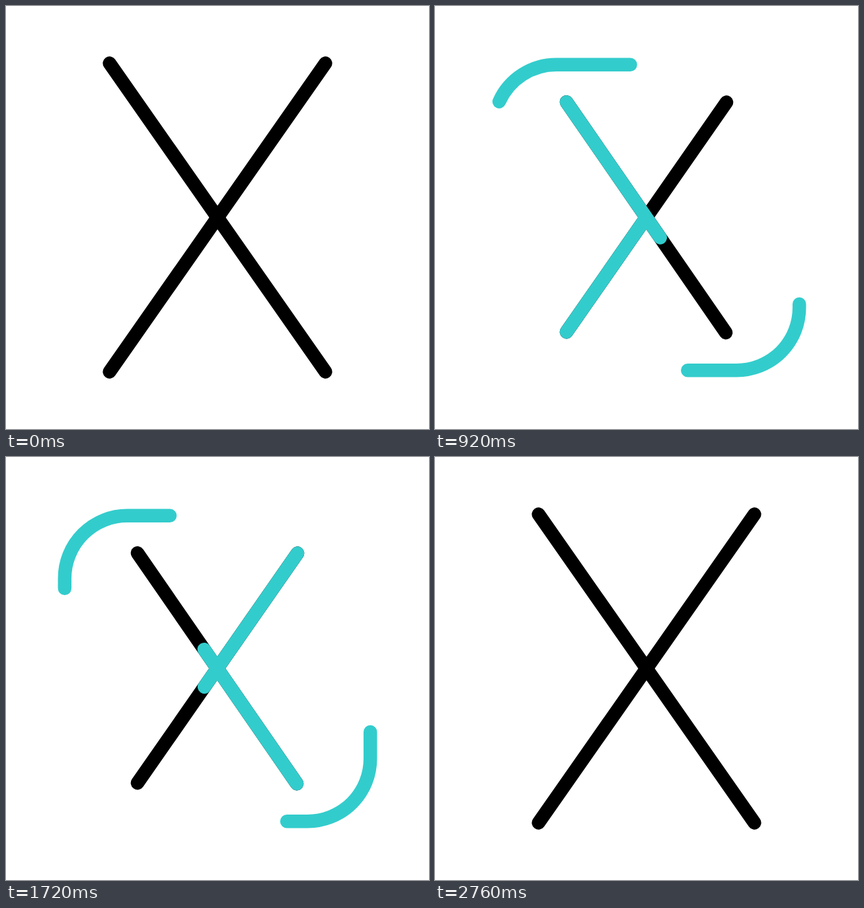
Animation of 640x640 px, one loop 3000 ms. Source, as an HTML page:

```html
<!DOCTYPE html>
<html lang="en">
<head>
<meta charset="utf-8">
<title>Crossing lines</title>
<style>
  html, body { margin: 0; width: 100%; height: 100%; overflow: hidden; background: #fff; }
  svg { display: block; width: 100vw; height: 100vh; }
  path, line { fill: none; stroke: #000; stroke-width: 20.5; stroke-linecap: round; }
  .teal { stroke: #3cc; }
</style>
</head>
<body>
<svg viewBox="0 0 640 640">
  <line id="bar0"/>
  <line id="bar1"/>
  <line id="fill0" class="teal"/>
  <line id="fill1" class="teal"/>
  <path id="arc0" class="teal" pathLength="1"
    d="M88.8 186V183.5A94.7 94.7 0 0 1 183.5 88.8H456.5A94.7 94.7 0 0 1 551.2 183.5V456.5A94.7 94.7 0 0 1 456.5 551.2H425"/>
  <path id="arc1" class="teal" pathLength="1"
    d="M551.2 451V456.5A94.7 94.7 0 0 1 456.5 551.2H183.5A94.7 94.7 0 0 1 88.8 456.5V183.5A94.7 94.7 0 0 1 183.5 88.8H248"/>
</svg>
<script>
const LOOP = 3000, STEP = 40;
const SPAN = 0.215; // share of the track covered by a travelling arc

// Times are [start, end] in ms; bar ends are [x1, y1, x2, y2].
const bars = [
  { wide: [156.7, 86.6, 483.3, 553.4], tight: [199, 145.3, 440, 494.2], enter: [513, 1241], leave: [1480, 2360] },
  { wide: [156.7, 553.4, 483.3, 86.6], tight: [199, 493.2, 441, 145.6], enter: [600, 1257], leave: [1480, 2360] }
];
const arcs = [
  { grow: [260, 718], travel: [816, 1562], shrink: [1882, 2373] },
  { grow: [340, 788], travel: [981, 1589], shrink: [1919, 2388] }
];
const squeeze = [160, 640], stretch = [2200, 2760];

const $ = id => document.getElementById(id);
const part = (t, [a, b]) => Math.min(1, Math.max(0, (t - a) / (b - a)));
const ease = (t, range) => { const u = part(t, range); return u * u * (3 - 2 * u); };
const easeOut = (t, range) => 1 - Math.pow(1 - part(t, range), 1.7);
const mix = (a, b, k) => a + (b - a) * k;

function setLine(el, [x1, y1, x2, y2], from, to) {
  el.setAttribute("x1", mix(x1, x2, from));
  el.setAttribute("y1", mix(y1, y2, from));
  el.setAttribute("x2", mix(x1, x2, to));
  el.setAttribute("y2", mix(y1, y2, to));
  el.style.display = to > from ? "" : "none";
}

function setTrim(el, from, to) {
  el.style.display = to > from ? "" : "none";
  el.style.strokeDasharray = `${Math.max(0, to - from)} 2`;
  el.style.strokeDashoffset = -from;
}

function draw(t) {
  const tight = ease(t, squeeze) - ease(t, stretch);
  bars.forEach((bar, i) => {
    const ends = bar.wide.map((v, j) => mix(v, bar.tight[j], tight));
    setLine($("bar" + i), ends, 0, 1);
    setLine($("fill" + i), ends, easeOut(t, bar.leave), ease(t, bar.enter));
  });
  arcs.forEach((arc, i) => {
    const shift = (1 - SPAN) * ease(t, arc.travel);
    setTrim($("arc" + i),
      shift + SPAN * ease(t, arc.shrink),
      shift + SPAN * ease(t, arc.grow));
  });
}

const start = performance.now();
function tick() {
  const t = performance.now() - start;
  draw(Math.floor((t + 2) / STEP) * STEP % LOOP);
  requestAnimationFrame(tick);
}
tick();
</script>
</body>
</html>
```
